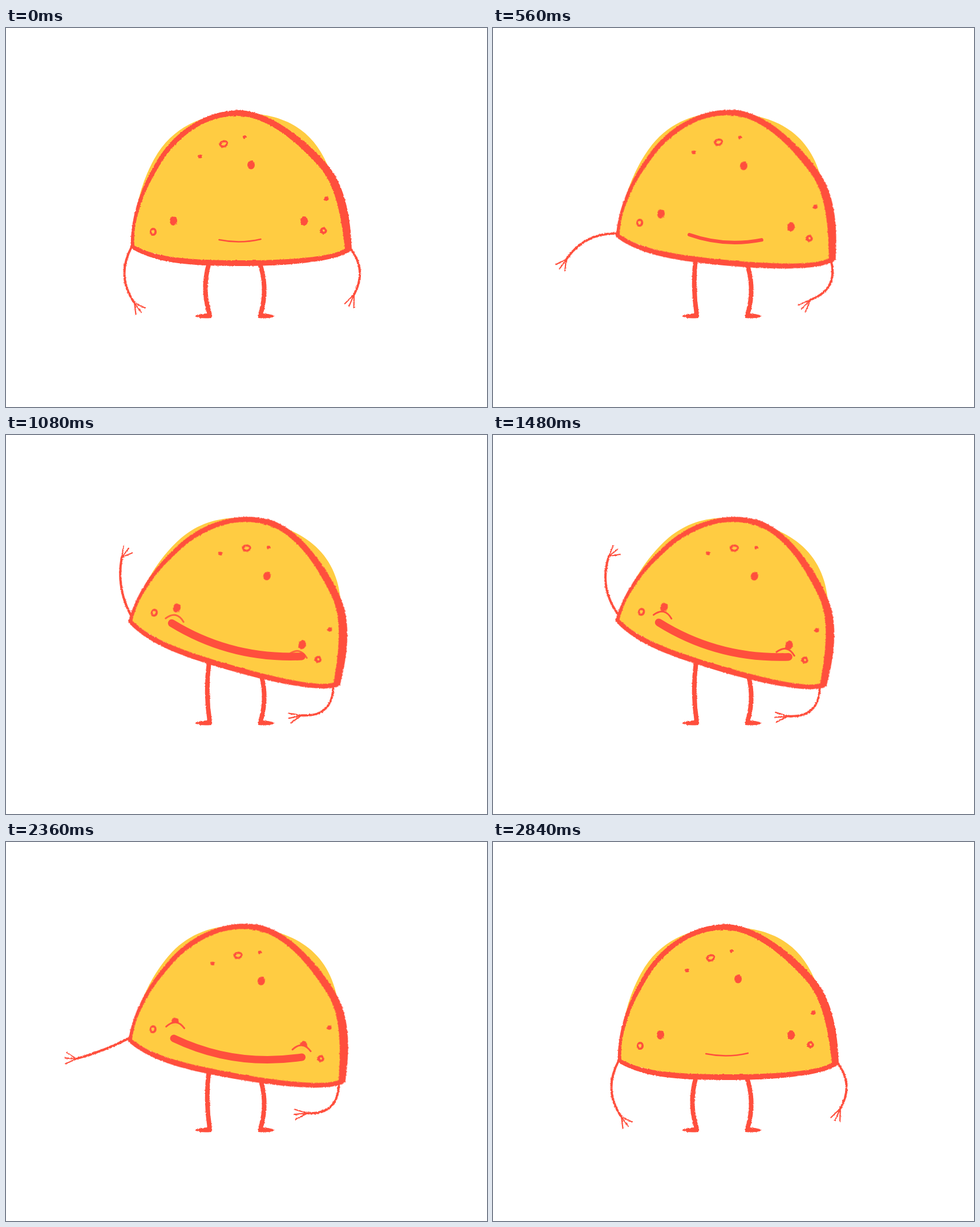
Write an HTML page that moves like this. It is 843 px wide and 664 px high and loops after 2.88 s.

```html
<!DOCTYPE html>
<html lang="en">
<head>
<meta charset="utf-8">
<title>Waving taco</title>
<style>
  html, body { margin: 0; width: 100%; height: 100%; overflow: hidden; background: #fff; }
  svg { display: block; width: 100%; height: 100%; }
  .line { fill: none; stroke: #ff4f3d; stroke-linecap: round; stroke-linejoin: round; }
  .red { fill: #ff4f3d; }
  .yellow { fill: #ffcc42; }
</style>
</head>
<body>
<svg viewBox="0 0 843 664">
  <defs>
    <filter id="rough" filterUnits="userSpaceOnUse" x="0" y="0" width="843" height="664" color-interpolation-filters="sRGB">
      <feTurbulence type="fractalNoise" baseFrequency=".35" numOctaves="2" seed="4" result="noise"/>
      <feDisplacementMap in="SourceGraphic" in2="noise" scale="3" xChannelSelector="R" yChannelSelector="G"/>
    </filter>
    <g id="cheek">
      <path class="yellow" d="M-16 9Q0 -9 16 9L11 16H-11Z"/>
      <path class="line" stroke-width="3" d="M-16 9Q0 -9 16 9"/>
    </g>
    <g id="foot">
      <path class="red" d="M360 500V508Q340 510 331 505Q338 500 360 500Z"/>
    </g>
  </defs>

  <g filter="url(#rough)">
    <path id="legL" class="line" stroke-width="8"/>
    <path class="line" stroke-width="8" d="M442 405Q461 452 446 502"/>
    <use href="#foot"/>
    <use href="#foot" transform="translate(802 0) scale(-1 1)"/>
    <path id="armL" class="line" stroke-width="4"/>
    <path id="handL" class="line" stroke-width="2.2"/>
    <path id="armR" class="line" stroke-width="4"/>
    <path id="handR" class="line" stroke-width="2.2"/>
  </g>

  <g id="body">
    <path class="yellow" d="M223 382C222 330 235 268 266 219C300 167 355 149 410 149C480 149 534 172 563 239
      C585 280 595 330 599 387C580 400 490 410 410 410C330 410 265 402 223 382Z"/>
    <g filter="url(#rough)">
      <path class="red" fill-rule="evenodd" d="M219 386C217 335 235 280 266 230C297 180 350 144 408 144
        C460 144 526 195 562 238C590 270 604 320 606 388C590 408 500 417 410 417C330 417 265 414 219 386Z
        M225 381C222 335 243 282 272 236C303 188 350 154 405 154C450 154 500 188 550 244
        C577 276 587 325 594 386C575 401 500 407 410 407C330 407 265 404 225 381Z"/>
      <g class="red">
        <ellipse cx="293.5" cy="338" rx="6.5" ry="8"/>
        <ellipse cx="522.5" cy="338" rx="6.5" ry="8"/>
        <ellipse cx="429.5" cy="240" rx="6.5" ry="7.5"/>
        <ellipse cx="340" cy="225" rx="4" ry="3.2"/>
        <ellipse cx="561.5" cy="299" rx="4" ry="3.8"/>
      </g>
      <g class="line" stroke-width="3.8">
        <path d="M417.5 192.5Q416.5 189.5 420 190"/>
        <ellipse cx="381.5" cy="203" rx="6.2" ry="4.6" transform="rotate(-14 381.5 203)"/>
        <ellipse cx="258" cy="357" rx="4.2" ry="5.2"/>
        <ellipse cx="556.5" cy="355" rx="4.2" ry="4"/>
      </g>
    </g>
    <use id="cheekL" href="#cheek"/>
    <use id="cheekR" href="#cheek"/>
    <path id="mouth" class="line"/>
  </g>
</svg>
<script>
const LOOP = 2880, STEP = 40, RAD = Math.PI / 180;
const PIVOT = [418.7, 340.9];
const $ = id => document.getElementById(id);
const set = (id, attrs) => { for (const k in attrs) $(id).setAttribute(k, attrs[k]); };

const ramp = (t, from, to) => {
  const u = Math.min(1, Math.max(0, (t - from) / (to - from)));
  return u * u * (3 - 2 * u);
};
// Eases 0 to 1 between a and b, and back between c and d.
const pulse = (t, a, b, c, d) => ramp(t, a, b) - ramp(t, c, d);

// Angles of limbs: 0 points down, 90 left, 180 up.
const polar = ([x, y], deg, r) => [x - Math.sin(deg * RAD) * r, y + Math.cos(deg * RAD) * r];

function onBody(x, y, deg) {
  const c = Math.cos(deg * RAD), s = Math.sin(deg * RAD), dx = x - PIVOT[0], dy = y - PIVOT[1];
  return [PIVOT[0] + dx * c - dy * s, PIVOT[1] + dx * s + dy * c];
}

function drawArm(side, shoulder, { angle, size, bend, hand, spread, finger }) {
  const wrist = polar(shoulder, angle, size);
  const elbow = polar(polar(shoulder, angle, size / 2), angle + 90, bend * 2);
  const fingers = [-1, 0, 1].map(i => `M${wrist}L${polar(wrist, hand + i * spread, finger)}`);
  set('arm' + side, { d: `M${shoulder}Q${elbow} ${wrist}` });
  set('hand' + side, { d: fingers.join('') });
}

function drawFace(t) {
  const smile = pulse(t, 220, 1100, 2280, 2860);
  const half = 36.5 + 81 * smile, yl = 371 - 5 * smile, yr = 370 - 12 * smile;
  const sag = 2 * (374.5 + 5.5 * smile) - (yl + yr) / 2;
  set('mouth', {
    d: `M${410 - half} ${yl}Q410 ${sag} ${410 + half} ${yr}`,
    'stroke-width': 2.6 + 11 * smile
  });

  const opacity = pulse(t, 760, 1200, 2280, 2840);
  const y = 352 - 14 * pulse(t, 800, 2240, 2360, 2880);
  set('cheekL', { transform: `translate(295 ${y}) rotate(-5)`, opacity });
  set('cheekR', { transform: `translate(520 ${y}) rotate(-5)`, opacity });
}

function draw(t) {
  const tilt = 16.8 * pulse(t, 160, 1190, 2050, 2780);
  const lean = Math.min(1, tilt / 4);
  set('body', { transform: `rotate(${tilt} ${PIVOT})` });
  set('legL', { d: `M${361 - 5 * lean} 397Q${340 + 9 * lean} 450 357 502` });
  drawFace(t);

  const lift = pulse(t, 200, 1060, 2030, 2620);
  const curl = pulse(t, 440, 1280, 2080, 2760);
  const angle = 174 * lift - 3;
  drawArm('L', onBody(220, 384 - 11 * lift, tilt), {
    angle, size: 98 + 5 * lift, bend: 15 - 28 * curl,
    hand: angle - 33 + 93 * curl, spread: 29, finger: 20
  });

  const swing = pulse(t, 0, 960, 2320, 2880);
  const flick = pulse(t, 0, 1400, 2400, 2880);
  drawArm('R', onBody(603 - 8 * swing, 386 + 6 * swing, tilt), {
    angle: 52 * swing - 5, size: 81 - 5 * swing, bend: -13.5 - 6.5 * swing,
    hand: 23 + 62 * flick, spread: 22, finger: 23
  });
}

const start = performance.now();
function tick(now) {
  const t = Math.max(0, now - start) % LOOP;
  draw(Math.floor(t / STEP) * STEP);
  requestAnimationFrame(tick);
}
draw(0);
requestAnimationFrame(tick);
</script>
</body>
</html>
```
